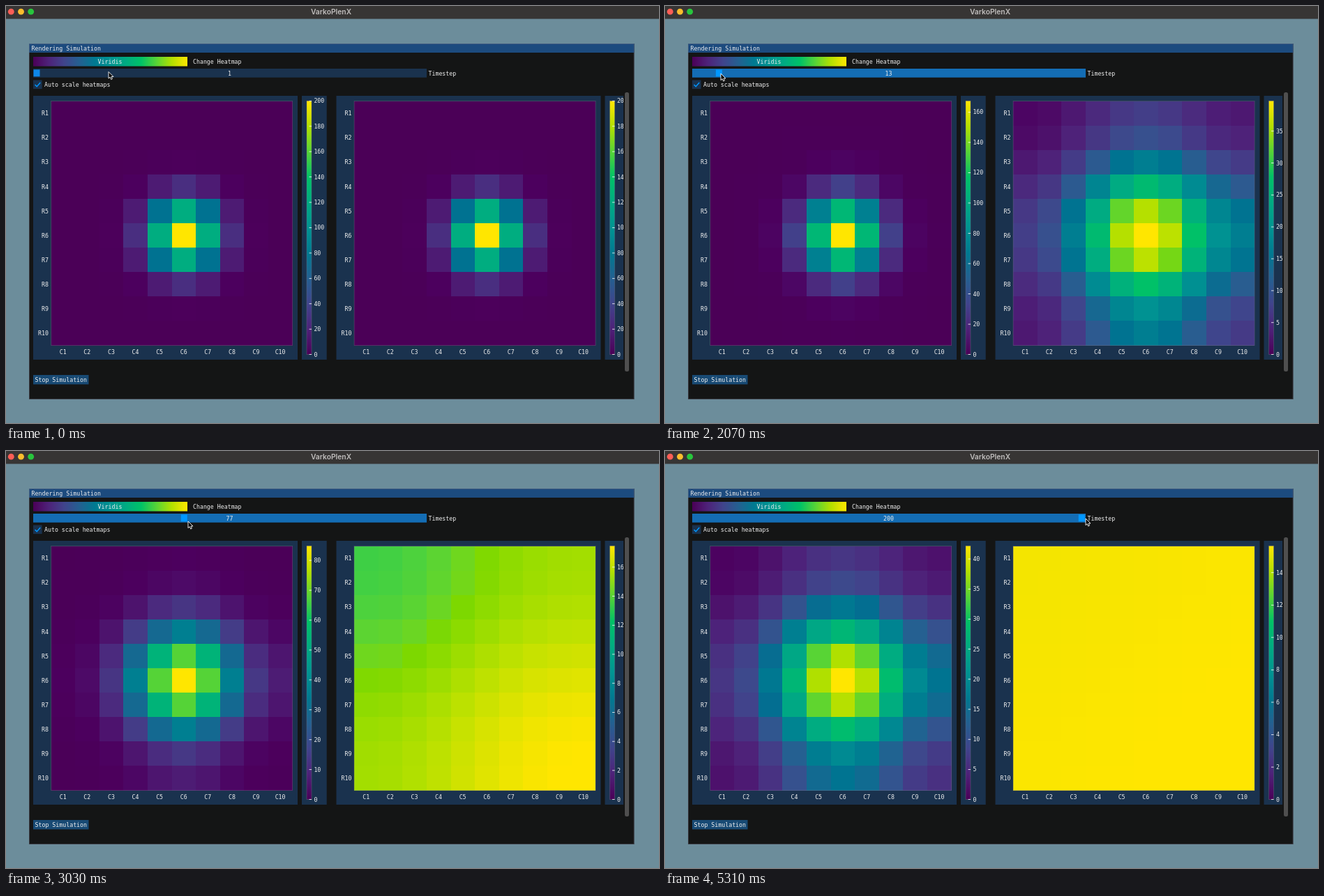
Recreate the animation shown at these times as an HTML page. Size 936 by 599 pixels, loop 5.85 s.

```html
<!DOCTYPE html>
<html lang="en">
<head>
<meta charset="utf-8">
<title>Heat simulation</title>
<style>
  html, body { margin: 0; width: 100%; height: 100%; overflow: hidden; background: #6a8d9a; }
  svg { display: block; width: 100vw; height: 100vh; }
  text { font: 8.25px "DejaVu Sans Mono", "Liberation Mono", monospace; fill: #eee; white-space: pre; }
  .title { font: 600 10.3px Inter, "Open Sans", sans-serif; fill: #c0bebd; }
  .cell { shape-rendering: crispEdges; }
</style>
</head>
<body>
<svg id="stage" viewBox="0 0 936 599" preserveAspectRatio="none"></svg>
<script>
const LOOP = 5850, STEP = 30, N = 10, PEAK = 200;
const stage = document.getElementById('stage');

// --- colour: wide-gamut values shown in sRGB
const toLin = c => (c /= 255) <= 0.04045 ? c / 12.92 : ((c + 0.055) / 1.055) ** 2.4;
const toByte = c => {
  c = Math.min(1, Math.max(0, c));
  return Math.round(255 * (c <= 0.0031308 ? c * 12.92 : 1.055 * c ** (1 / 2.4) - 0.055));
};
function rgb(...c) {
  const [r, g, b] = c.map(toLin);
  return `rgb(${[1.2249 * r - 0.2247 * g, 1.0419 * g - 0.042 * r,
    1.0979 * b - 0.0786 * g - 0.0197 * r].map(toByte)})`;
}
const mix = (a, b, k) => a.map((v, i) => v + (b[i] - v) * k);

const VIRIDIS = ['440154', '482475', '414487', '355f8d', '2a788e', '219191',
  '22a884', '44bf70', '7ad151', 'bddf26', 'fde725']
  .map(h => [0, 2, 4].map(i => parseInt(h.substr(i, 2), 16)));
function viridis(k) {
  const p = Math.min(1, Math.max(0, k)) * 10, i = Math.min(9, Math.floor(p));
  return rgb(...mix(VIRIDIS[i], VIRIDIS[i + 1], p - i));
}

const PANE = [20, 21, 21], ACCENT = [66, 150, 250];
const FRAME = rgb(...mix(PANE, [41, 74, 122], 0.54));
const HOVER = rgb(...mix(PANE, ACCENT, 0.4));
const ACTIVE = rgb(...mix(PANE, ACCENT, 0.67));
const GRAB = rgb(61, 133, 224), BRIGHT = rgb(...ACCENT);
const BORDER = { fill: 'none', stroke: 'rgb(110,110,128)', 'stroke-opacity': 0.5, 'stroke-width': 0.8 };

// --- drawing helpers
function add(tag, attrs, parent = stage) {
  const e = document.createElementNS('http://www.w3.org/2000/svg', tag);
  for (const k in attrs) e.setAttribute(k, attrs[k]);
  parent.appendChild(e);
  return e;
}
const box = (x, y, w, h, fill, more, parent) =>
  add('rect', { x, y, width: w, height: h, fill, ...more }, parent);
function label(str, x, y, anchor = 'start', parent = stage) {
  const e = add('text', { x, y: y + 3, 'text-anchor': anchor }, parent);
  e.textContent = str;
  return e;
}
const defs = add('defs', {});
function gradient(id, dir) {
  const g = add('linearGradient', { id, ...dir }, defs);
  VIRIDIS.forEach((c, i) => add('stop', { offset: i / 10, 'stop-color': rgb(...c) }, g));
}
gradient('across', { x1: 0, y1: 0, x2: 1, y2: 0 });
gradient('up', { x1: 0, y1: 1, x2: 0, y2: 0 });
box(0, 0, 885, 599, '#000', {}, add('clipPath', { id: 'view' }, defs));

// --- window
box(0, 0, 936, 599, rgb(115, 140, 153));
box(0, 0, 936, 18.5, '#373534');
['#fd5e56', '#fbbd2d', '#28c53d'].forEach((fill, i) =>
  add('circle', { cx: 7.3 + 14.2 * i, cy: 8.2, r: 4.4, fill }));
const head = label('VarkoPlenX', 466, 8.8, 'middle');
head.setAttribute('class', 'title');

box(33, 54, 867.5, 511, rgb(...PANE));
box(33, 54, 867.5, 13, rgb(41, 74, 122));
box(33.4, 54.4, 866.7, 510.2, 'none', BORDER);
label('Rendering Simulation', 36.6, 61);

// --- controls
box(39, 73, 221, 13.5, 'url(#across)');
label('Viridis', 149, 80, 'middle');
label('Change Heatmap', 268, 80);
const track = box(39, 90, 564, 12.7, FRAME);
const grab = box(39.5, 91.4, 9, 9.9, GRAB);
const count = label('', 320.5, 96.6, 'middle');
label('Timestep', 605.5, 96.6);
box(39, 106.5, 12.6, 12.6, FRAME);
add('path', { d: 'M41.6 113l2.6 2.7 5-5.6', fill: 'none', stroke: BRIGHT, 'stroke-width': 1.5 });
label('Auto scale heatmaps', 55, 112.7);
box(39, 530, 79.5, 13.5, HOVER);
label('Stop Simulation', 41.5, 537);
box(887, 124, 6, 401, '#4f4f4f', { rx: 2.5 });

// --- heat: cosine modes on a grid mirrored at its edge nodes
const range = [...Array(N).keys()];
const edge = i => i === 0 || i === N - 1 ? 0.5 : 1;
const wave = (n, i) => Math.cos(Math.PI * n * i / (N - 1));
const modes = range.map(n => edge(n) * 2 / (N - 1) *
  range.reduce((s, i) => s + edge(i) * Math.exp(-((i - 5) ** 2) / 2) * wave(n, i), 0));
const profile = spread => range.map(i => range.reduce((s, n) =>
  s + modes[n] * wave(n, i) * Math.exp(-spread * (2 - 2 * wave(n, 1))), 0));

function tickStep(top) {
  const x = top * 0.99, e = 10 ** Math.floor(Math.log10(x));
  return [1, 2, 5, 10].find(m => x / e <= m) * e / 10;
}

function heatmap(x, rate) {
  const W = 34.6, H = 35.1, left = x + 25.6, top = 136.5, g = add('g', { 'clip-path': 'url(#view)' });
  box(x, 129, 379, 379, FRAME, {}, g);
  const cells = range.map(r => range.map(c => {
    const x0 = Math.round(left + c * W), y0 = Math.round(top + r * H);
    return box(x0, y0, Math.round(left + (c + 1) * W) - x0, Math.round(top + (r + 1) * H) - y0,
      '#000', { class: 'cell' }, g);
  }));
  box(left, top, W * N, H * N, 'none', BORDER, g);
  range.forEach(i => {
    label('R' + (i + 1), x + 22, 154.2 + i * H, 'end', g);
    label('C' + (i + 1), left + (i + 0.5) * W - 0.2, 496.6, 'middle', g);
  });
  box(x + 385, 129, 35.7, 379, FRAME, {}, g);
  box(x + 392, 136.3, 7, 364.3, 'url(#up)', {}, g);
  box(x + 392, 136.3, 7, 364.3, 'none', BORDER, g);
  const ticks = add('g', {}, g);

  return step => {
    const f = profile(rate * (step - 1)), max = Math.max(...f);
    cells.forEach((row, r) => row.forEach((cell, c) =>
      cell.setAttribute('fill', viridis(f[r] * f[c] / max ** 2))));
    const peak = PEAK * max ** 2, gap = tickStep(peak);
    ticks.textContent = '';
    for (let v = 0; v <= peak + 0.01; v += gap) {
      const y = 500.6 - 364.3 * v / peak;
      box(x + 395.5, y - 0.4, 3.6, 0.8, '#fff', {}, ticks);
      label(String(Math.round(v)), x + 402.4, y, 'start', ticks);
    }
  };
}
const maps = [heatmap(39, 0.01), heatmap(473.5, 0.1785)];

const cursor = add('path', {
  d: 'M0 0V9.6L2.2 7.6 3.7 11 5.4 10.2 4 7H7Z',
  fill: '#000', stroke: '#fff', 'stroke-width': 0.9, 'stroke-linejoin': 'round'
});

// --- motion: [ms, value] keys joined by monotone curves
const STEPS = [[1290, 1], [1650, 3.5], [2070, 13], [2460, 35], [3030, 77], [3870, 145], [4500, 180], [5190, 200]];
const MOVE_X = [[780, 147], [930, 45], [1260, 45], [1650, 53], [2070, 80], [2460, 144],
  [3030, 261], [3870, 445], [4500, 545], [5220, 602.5], [5310, 603]];
const MOVE_Y = [[780, 94.5], [930, 93], [1260, 93], [2070, 97], [2460, 99], [3030, 101], [3870, 99], [5310, 97]];

function follow(keys, t) {
  const last = keys.length - 1;
  if (t <= keys[0][0]) return keys[0][1];
  if (t >= keys[last][0]) return keys[last][1];
  const slope = i => (keys[i + 1][1] - keys[i][1]) / (keys[i + 1][0] - keys[i][0]);
  const tangent = i => {
    if (i === 0 || i === last) return 0;
    const a = slope(i - 1), b = slope(i);
    return a * b > 0 ? 2 * a * b / (a + b) : 0;
  };
  const i = keys.findIndex(k => k[0] > t) - 1;
  const [t0, a] = keys[i], [t1, b] = keys[i + 1], d = t1 - t0, k = (t - t0) / d;
  return a + (b - a) * k * k * (3 - 2 * k) +
    d * k * (1 - k) * (tangent(i) * (1 - k) - tangent(i + 1) * k);
}

let shown = 0;
function draw(t) {
  const step = Math.round(follow(STEPS, t)), pressed = t > 1100;
  track.setAttribute('fill', pressed ? ACTIVE : t >= 870 ? HOVER : FRAME);
  grab.setAttribute('fill', pressed ? BRIGHT : GRAB);
  cursor.setAttribute('transform', `translate(${follow(MOVE_X, t)} ${follow(MOVE_Y, t)})`);
  if (step === shown) return;
  shown = step;
  grab.setAttribute('x', 39.5 + 2.78 * (step - 1));
  count.textContent = step;
  maps.forEach(paint => paint(step));
}

const start = performance.now();
function tick() {
  const t = (performance.now() - start) % LOOP;
  draw(Math.floor(t / STEP) * STEP);
  requestAnimationFrame(tick);
}
tick();
</script>
</body>
</html>
```
